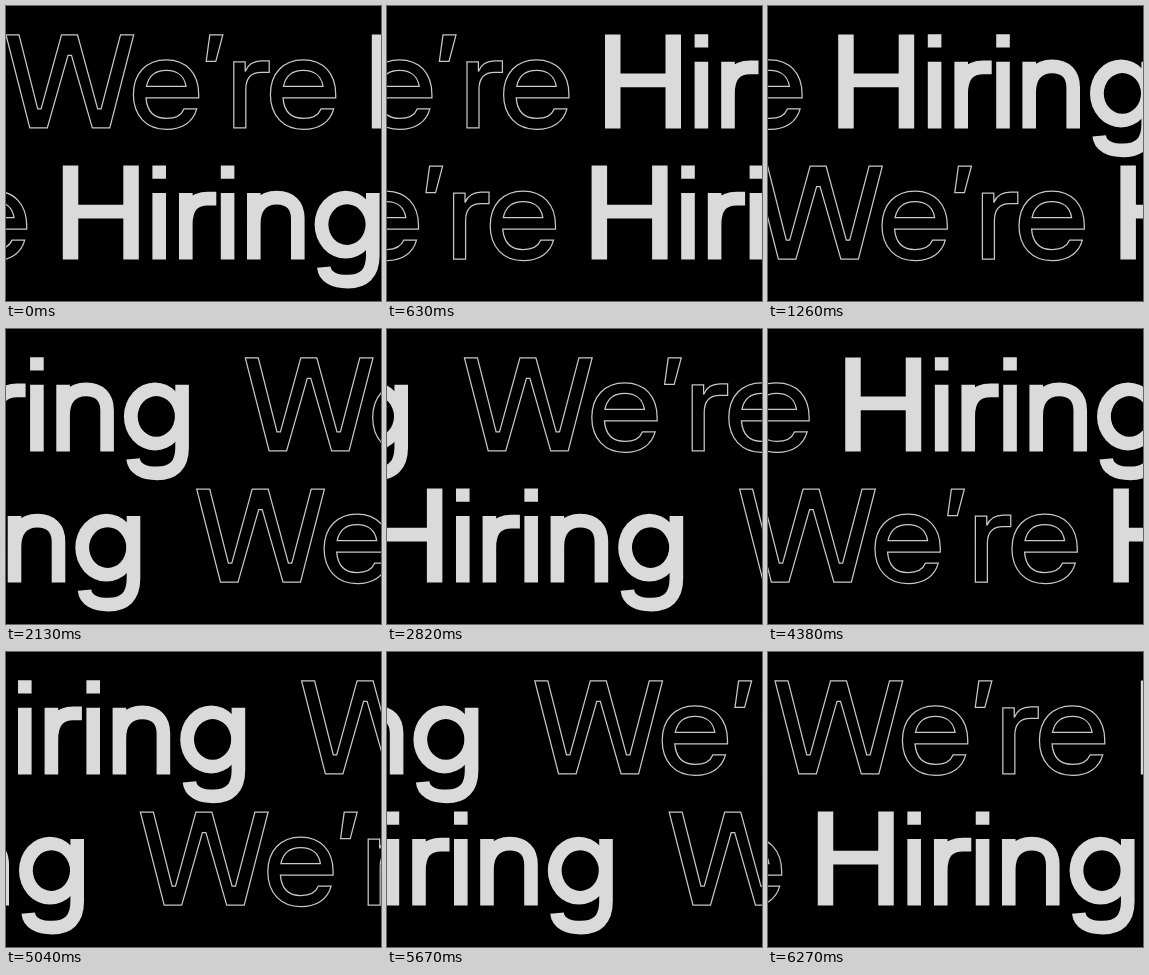
Write an HTML page that moves like this. It is 375 by 295 pixels and loops after 6.3 s.

```html
<!DOCTYPE html>
<html lang="en">
<head>
<meta charset="utf-8">
<title>We're Hiring</title>
<style>
  html, body { margin: 0; width: 100%; height: 100%; overflow: hidden; background: #000; }
  svg { display: block; width: 375px; height: 295px; }
  .outline { fill: none; stroke: #c8c8c8; stroke-width: 1.25; }
  .solid { fill: none; stroke: #dadada; stroke-width: 13.6; }
  .solid .heavy { stroke-width: 15.5; }
  .solid .bowl { fill: #dadada; fill-rule: evenodd; stroke: none; }
</style>
</head>
<body>
<svg viewBox="0 0 375 295" role="img" aria-label="We're Hiring">
  <defs>
    <!-- Letters sit on a baseline at y = 0 -->
    <path id="e" d="M65.7 -30.5 H13 C14 -17.5 21 -10 33.5 -10 C42.5 -10 48.5 -13.3 51 -19.5 H63.7
      C60.2 -6.5 49.5 1 33.5 1 C13.3 1 0.4 -12.8 0.4 -33.8 C0.4 -55 13.3 -68.6 33.3 -68.6
      C53.2 -68.6 65.7 -55.3 65.7 -34 Z
      M13.5 -42 H53 C51.5 -52 44.5 -58 33.3 -58 C22.5 -58 15.5 -52 13.5 -42 Z"/>

    <g id="were" class="outline">
      <path d="M0.5 -93.5 H13.5 L32.2 -19.5 H35.6 L56 -93.5 H72 L92.2 -19.5 H95.6 L115 -93.5 H128.2
        L104.3 -0.5 H86.8 L66 -73 H62.5 L41.8 -0.5 H24.3 Z"/>
      <use href="#e" x="127.5"/>
      <path d="M204.3 -93.5 H217.3 L210.3 -67 H200.7 Z"/>
      <path d="M228.3 -0.5 V-66.5 H239.7 V-57 Q244 -67.5 256 -67.5 H263.7 V-56 H256 Q240.3 -56 240.3 -39 V-0.5 Z"/>
      <use href="#e" x="264.5"/>
    </g>

    <path id="i" d="M0 0 V-66.7 M0 -80.8 V-94.2"/>

    <g id="hiring" class="solid">
      <path class="heavy" d="M7.75 0 V-94 M68.25 0 V-94"/>
      <path d="M8 -48 H68"/>
      <use href="#i" x="96.4"/>
      <path d="M123 0 V-66.7 M123 -35 C123 -53 131 -61 145 -61 H153.5"/>
      <use href="#i" x="164.8"/>
      <path d="M191 0 V-66.7 M191 -36 C191 -53 200 -62 214 -62 C228 -62 235 -54 235 -41 V0"/>
      <path class="bowl" d="M251.8 -35 a31 34 0 0 1 62 0 a31 34 0 0 1 -62 0 Z
        M265.6 -35 a18.6 20.3 0 0 0 37.2 0 a18.6 20.3 0 0 0 -37.2 0 Z"/>
      <path d="M310 -66.7 V-4 C310 14 301 22 285 22 C271 22 262 17 261 7.5"/>
    </g>

    <g id="phrase">
      <use href="#were" x="-0.5"/>
      <use href="#hiring" x="365.8"/>
    </g>
    <g id="strip">
      <use href="#phrase"/>
      <use href="#phrase" x="739"/>
    </g>
  </defs>

  <rect width="375" height="295"/>
  <use id="top" href="#strip"/>
  <use id="bottom" href="#strip"/>
</svg>
<script>
  const LOOP = 6300;
  const STEP = 30;
  const PHRASE_WIDTH = 739;
  const PHRASES_PER_LOOP = 2;
  const BOTTOM_START = 430;

  const topRow = document.getElementById('top');
  const bottomRow = document.getElementById('bottom');

  function place(row, x, baseline) {
    row.setAttribute('transform', `translate(${x.toFixed(2)} ${baseline})`);
  }

  function draw(time) {
    const stepped = Math.floor((time % LOOP) / STEP) * STEP;
    const shift = stepped / LOOP * PHRASES_PER_LOOP * PHRASE_WIDTH;
    place(topRow, -(shift % PHRASE_WIDTH), 122.4);
    place(bottomRow, (BOTTOM_START + shift) % PHRASE_WIDTH - PHRASE_WIDTH, 253.6);
  }

  const start = performance.now();
  function tick() {
    draw(performance.now() - start);
    requestAnimationFrame(tick);
  }
  tick();
</script>
</body>
</html>
```
